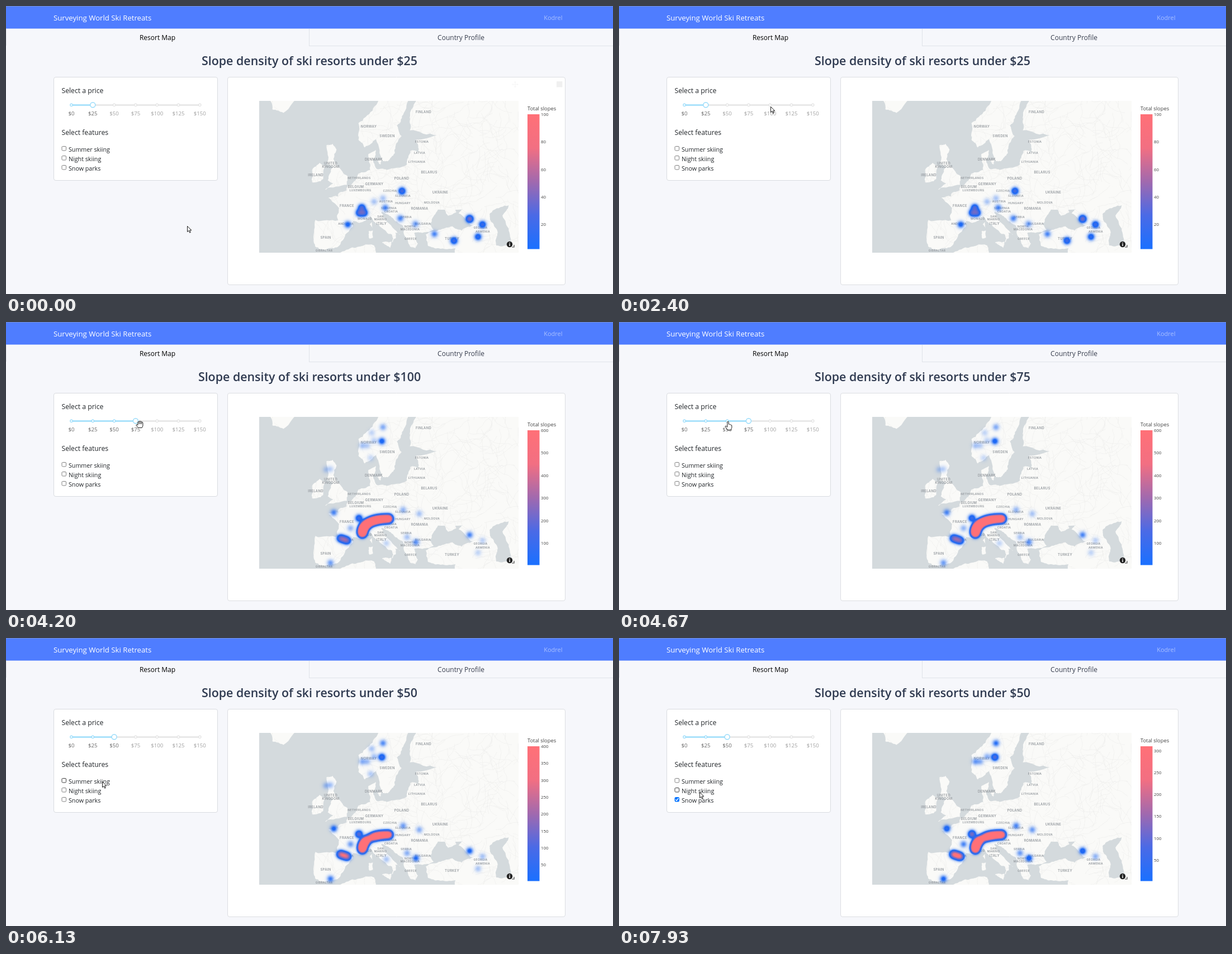
An HTML page with a canvas for the animation above (8000 ms loop, 1086 by 516 pixels).

```html
<!DOCTYPE html>
<html lang="en">
<head>
<meta charset="utf-8">
<title>Ski map</title>
<style>
html, body { margin: 0; width: 100%; height: 100%; overflow: hidden; background: #f6f7fb; }
canvas { display: block; }
</style>
</head>
<body>
<canvas id="stage" width="1086" height="516"></canvas>
<script>
const ctx = document.getElementById('stage').getContext('2d');
const SANS = '"Open Sans", "Noto Sans", sans-serif';
const MAP = { x: 453, y: 170, w: 464, h: 272 };
const BAR = { x: 933, y: 194, w: 21.5, h: 241.5 };

let seed = 11;
const random = () => (seed = seed * 16807 % 2147483647) / 2147483647;

function layer(draw) {
  const c = document.createElement('canvas');
  c.width = 1086;
  c.height = 516;
  draw(c.getContext('2d'));
  return c;
}

function text(g, str, x, y, size, color, { align = 'left', weight = 400, family = SANS } = {}) {
  g.font = `${weight} ${size}px ${family}`;
  g.textAlign = align;
  g.fillStyle = color;
  g.fillText(str, x, y);
}

function finish(g, fill, stroke, width) {
  g.fillStyle = fill;
  g.fill();
  if (!stroke) return;
  g.strokeStyle = stroke;
  g.lineWidth = width;
  g.stroke();
}

function disc(g, x, y, r, fill, stroke, width = 1) {
  g.beginPath();
  g.arc(x, y, r, 0, 7);
  finish(g, fill, stroke, width);
}

function box(g, x, y, w, h, r, fill, stroke) {
  g.beginPath();
  g.roundRect(x, y, w, h, r);
  finish(g, fill, stroke, 1);
}

function lines(g, d, color, width) {
  g.strokeStyle = color;
  g.lineWidth = width;
  g.stroke(new Path2D(d));
}

// ---- Map: key "lon lat" points of each coast, roughened by rule ----
const LAND = {
  scandinavia: '12 66,9.5 63.7,5 61.9,5 59.3,7 58,10.6 59.4,12.8 55.6,14.4 55.6,16.6 57,17 58.6,18.8 59.9,17.3 61.5,19.5 63.4,22 66',
  baltic: '24.5 66,21.5 63,21.4 60.8,30 60,23.5 59.3,24.2 57.2,21.6 57.4,20.5 55,14 54,10.8 54.2,9.7 55.6,10.5 57.6,8.1 56.8,8.7 54,5 53.3,3 51.3,3 46,57 46,57 66',
  west: '6 52,1.5 50.9,1.3 50,-1.4 49.3,-1.5 48.7,-4.6 48.4,-1.2 46.2,-1.5 43.4,-8.8 43.5,-9.3 38.7,-8.8 37,-5.6 36,-2 36.8,0 38.6,3.2 41.9,3.2 43.2,6.5 43.1,8.8 44.4,12.3 41.7,15.7 40,15.8 38,17 39.2,16.8 40.5,18.4 39.9,16 41.6,13.6 43.5,12.3 45.2,13.7 45.7,20 50',
  southeast: '12 46,13.7 44.9,16.5 43.4,19.4 41.8,19.5 40.2,21.5 37,23.2 36.6,24 37.7,22.8 40.4,26.2 40.6,29 41.2,27.7 42.6,29.8 45.2,31 46.6,32.7 45.7,33.6 44.5,36.3 45.3,35.5 46.4,39.2 47.2,37 45,41.5 42.2,38 41,35 42,31.3 41.2,26.5 40,27.2 37.2,30.6 36.6,36 36.6,36 35,57 35,57 51,20 51',
  britain: '-5.7 50.1,1.4 51.1,1.6 52.7,.2 53.3,-3 56,-2 57.6,-3.2 58.6,-5.2 58.4,-5 55,-3 54.5,-4.8 52,-3 51.4',
  ireland: '-6.2 53.5,-6.4 52.2,-9.8 51.6,-9.8 54,-7.4 55.3,-5.6 54.6',
  iceland: '-24 66,-22.5 63.9,-19 63.4,-13.7 66',
  corsica: '8.6 42.4,9.4 43,9.5 41.5',
  sardinia: '8.3 40.9,9.6 41,9.6 39.2,8.5 39',
  sicily: '12.5 38,15.6 38.2,15.1 36.7',
  zealand: '11 55.7,12.5 56,12 55',
  africa: '-2 35,3 36.8,10 37.3,10.5 35'
};
const CASPIAN = '47 45,47.5 43,49.5 40.5,49 37.3,54 37,53 41,51 44.5,53 46.8,48 45.7';

const project = (lon, lat) => [
  602.6 + 5.6 * lon,
  654.5 - 321 * Math.log(Math.tan(Math.PI / 4 + lat * Math.PI / 360))
];

function roughen(points) {
  return points.flatMap(([x, y], i) => {
    const [nx, ny] = points[(i + 1) % points.length];
    const bend = Math.min(.3, 4 / Math.hypot(nx - x, ny - y)) * (random() - .5);
    return [[x, y], [(x + nx) / 2 + (y - ny) * bend, (y + ny) / 2 + (nx - x) * bend]];
  });
}

function coast(str) {
  let points = str.split(',').map(pair => project(...pair.split(' ').map(Number)));
  for (let i = 0; i < 3; i++) points = roughen(points);
  return new Path2D('M' + points.join('L') + 'Z');
}

// "/" starts a new line
const BIG_LABELS = 'NORWAY 649 218,SWEDEN 682 235,FINLAND 747 192,DENMARK 658 277,UNITED/KINGDOM 581 284,GERMANY 659 321,POLAND 708 311,BELARUS 757 300,UKRAINE 777 336,FRANCE 610 360,SPAIN 572 417,ITALY 672 392,TURKEY 798 419,ROMANIA 740 365,BELGIUM 626 326,IRELAND 554 305';
const SMALL_LABELS = 'ESTONIA 744 245,LATVIA 740 265,LITHUANIA 735 281,NETHERLANDS 632 310,LUXEMBOURG 634 332,CZECHIA 687 333,SLOVAKIA 710 342,AUSTRIA 680 352,HUNGARY 710 355,MOLDOVA 762 354,SLOVENIA 685 364,CROATIA 689 370,SAN/MARINO 670 379,MONACO 642 383,ANDORRA 608 392,SERBIA 716 380,BULGARIA 746 392,NORTH/MACEDONIA 723 397,GREECE 724 419,GEORGIA 849 399,ARMENIA 853 406,GIBRALTAR 569 440';

function drawLabels(g, labels, size) {
  g.letterSpacing = '0.3px';
  for (const label of labels.split(',')) {
    const [name, x, y] = label.split(' ');
    name.split('/').forEach((line, i) =>
      text(g, line, +x, +y + i * (size + .3), size, '#959a9f', { align: 'center', weight: 600, family: 'Inter, sans-serif' }));
  }
}

function drawRoads(g) {
  g.lineWidth = .6;
  g.strokeStyle = '#ededeb';
  for (let i = 0; i < 420; i++) {
    let x = MAP.x + random() * MAP.w, y = MAP.y + random() * MAP.h, angle = random() * 6.3;
    g.beginPath();
    g.moveTo(x, y);
    for (let k = 0; k < 9; k++) {
      angle += random() - .5;
      g.lineTo(x += 5 * Math.cos(angle), y += 5 * Math.sin(angle));
    }
    g.stroke();
  }
}

function drawMap(g) {
  g.beginPath();
  g.rect(MAP.x, MAP.y, MAP.w, MAP.h);
  g.clip();
  g.fillStyle = '#d4dadd';
  g.fill();
  g.save();
  const land = new Path2D();
  g.fillStyle = '#fafaf8';
  for (const part of Object.values(LAND).map(coast)) {
    g.fill(part);
    land.addPath(part);
  }
  g.clip(land);
  drawRoads(g);
  g.restore();
  g.fillStyle = '#d4dadd';
  g.fill(coast(CASPIAN));
  drawLabels(g, BIG_LABELS, 5.9);
  drawLabels(g, SMALL_LABELS, 5.1);
}

// ---- Heat layers: [x, y, weight] summed as Gaussians ----
const CHEAP = [
  [636, 361, .24], [632, 370, .25], [640, 370, .25], [708, 331, .22], [658, 350, .04], [674, 344, .04], [678, 361, .09],
  [611, 391, .13], [705, 380, .09], [732, 390, .07], [766, 408, .09], [801, 420, .21], [829, 381, .34], [852, 391, .2], [844, 413, .17]
];
const RESORTS = [
  [674, 188, .06], [654, 198, .028], [672, 213, .14], [658, 212, .03], [637, 221, .04], [646, 221, .03], [652, 243, .025],
  [572, 264, .028], [580, 263, .028], [586, 341, .09], [616, 369, .05], [710, 336, .05], [739, 343, .04], [829, 381, .09],
  [852, 391, .03], [844, 413, .028], [733, 394, .08], [717, 385, .04], [680, 396, .028], [580, 431, .07], [631, 351, .2]
];

// resorts strung along an arc, thinning out in its middle by `gap`
function alps(weight, gap) {
  return Array.from({ length: 13 }, (_, i) => {
    const u = i / 12, v = 1 - u;
    return [
      637 * v * v + 1274 * u * v + 684 * u * u,
      378 * v * v + 706 * u * v + 352 * u * u,
      weight * (1 - gap * Math.exp(-(((u - .52) / .13) ** 2)))
    ];
  });
}
const pyrenees = weight => [598, 604, 610].map((x, i) => [x, 387 + 2 * i, weight]);
const scaled = (points, k) => points.map(([x, y, w]) => [x, y, w * k]);

function heat(points) {
  return layer(g => {
    const image = g.createImageData(MAP.w, MAP.h);
    for (let p = 0; p < MAP.w * MAP.h; p++) {
      const px = MAP.x + p % MAP.w, py = MAP.y + Math.floor(p / MAP.w);
      let v = 0;
      for (const [x, y, w] of points) v += w * Math.exp(-((x - px) ** 2 + (y - py) ** 2) / 34);
      const mix = Math.min(1, Math.max(0, (v - .13) / .55));
      image.data.set([28 + 227 * mix, 104 + 8 * mix, 245 - 126 * mix, 255 * Math.min(1, v / .11)], p * 4);
    }
    g.putImageData(image, MAP.x, MAP.y);
  });
}

const HEAT = {
  cheap: heat(CHEAP),
  wide: heat([...RESORTS, ...alps(1.3, .2), ...pyrenees(.28)]),
  mid: heat([...scaled(RESORTS, 1.4), ...alps(1, .7), ...pyrenees(.42)]),
  parks: heat([...scaled(RESORTS.filter(r => r[2] >= .03), 1.8), ...alps(1.1, .65), ...pyrenees(.5)])
};

// ---- Static page ----
const page = layer(g => {
  g.fillStyle = '#f6f7fb';
  g.fillRect(0, 0, 1086, 516);
  g.fillStyle = '#4f7dff';
  g.fillRect(0, 0, 1086, 40.5);
  g.fillStyle = '#7590d8';
  g.fillRect(0, 0, 1086, 1);
  text(g, 'Surveying World Ski Retreats', 85, 25.5, 13.2, '#fff');
  text(g, 'Kodrel', 995.5, 24.5, 11, '#a9c0ff', { align: 'right' });

  g.fillStyle = '#e0e3e9';
  g.fillRect(0, 41, 1, 30);
  g.fillRect(542, 41, 1, 31);
  g.fillRect(543, 71, 543, 1);
  text(g, 'Resort Map', 271, 60.5, 12, '#000', { align: 'center' });
  text(g, 'Country Profile', 814, 60.5, 12, '#373d4d', { align: 'center' });

  box(g, 85.5, 127.5, 293, 185, 3.5, '#fff', '#d9dbe0');
  box(g, 396.5, 127.5, 604, 372, 3.5, '#fff', '#dcdee2');
  text(g, 'Select a price', 99.5, 156, 12.2, '#212529');
  text(g, 'Select features', 99.5, 231, 12.2, '#212529');
  text(g, 'Total slopes', BAR.x, 187, 9.3, '#444');

  const ramp = g.createLinearGradient(0, BAR.y, 0, BAR.y + BAR.h);
  ['#ff7077', '#f26f82', '#a169ae', '#4a6ae6', '#1a70ff'].forEach((color, i) => ramp.addColorStop(i / 4, color));
  g.fillStyle = ramp;
  g.fillRect(BAR.x, BAR.y, BAR.w, BAR.h);
  drawMap(g);
});

// ---- Timeline ----
const EVENTS = [
  [0, { slider: 1, price: 25, heat: 'cheap', max: 100, snow: false }],
  [2860, { slider: 4 }],
  [3190, { price: 100, heat: 'wide', max: 600 }],
  [4190, { slider: 3 }],
  [4520, { price: 75 }],
  [4720, { slider: 2 }],
  [4990, { price: 50, max: 400 }],
  [5060, { heat: 'mid' }],
  [7060, { snow: true }],
  [7390, { heat: 'parks', max: 310 }]
];
const stateAt = t => Object.assign({}, ...EVENTS.filter(([start]) => t >= start).map(([, change]) => change));

// pointer moves: start, end, x, y
const MOVES = [
  [0, 200, 328, 405], [333, 600, 330, 396], [800, 1000, 326, 353], [1133, 1470, 425, 297], [1700, 2133, 272, 183],
  [2333, 2530, 270, 173], [3533, 4000, 239, 178], [4400, 4667, 195, 178], [5200, 5470, 202, 175], [5470, 5870, 180, 249],
  [5870, 6733, 144, 287], [6733, 6800, 144, 295], [7000, 7200, 143, 287], [7467, 7933, 144, 276]
];

function pointerAt(t) {
  let x = 324, y = 394;
  for (const [start, end, toX, toY] of MOVES) {
    const k = Math.min(1, Math.max(0, (t - start) / (end - start)));
    const ease = k * k * (3 - 2 * k);
    x += (toX - x) * ease;
    y += (toY - y) * ease;
  }
  return { x, y };
}

// ---- Moving parts ----
const stop = i => 117 + 38.3 * i;

function drawSlider(value) {
  box(ctx, 117, 176, 230, 3, 1.5, '#e9e9e9');
  box(ctx, 117, 176, stop(value) - 117, 3, 1.5, '#abe2fb');
  for (let i = 0; i < 7; i++) {
    const on = i <= value;
    disc(ctx, stop(i), 177.3, 2.2, '#fff', on ? '#96dbfa' : '#e2e2e2', 1.2);
    text(ctx, '$' + 25 * i, stop(i), 196, 9.6, on ? '#666' : '#a0a0a0', { align: 'center' });
  }
  disc(ctx, stop(value), 177.3, 4.5, '#fff', '#96dbfa', 1.4);
}

function drawChecks(snow, { x, y }) {
  ['Summer skiing', 'Night skiing', 'Snow parks'].forEach((name, i) => {
    const top = 251.5 + 17 * i;
    const hover = x > 99 && x < 186 && y > top - 4 && y <= top + 13;
    const checked = snow && i === 2;
    const edge = hover ? '#3c3c3c' : '#808080';
    box(ctx, 100, top, 7.5, 7.5, 1.5, checked ? '#0075ff' : '#fff', checked ? '#0075ff' : edge);
    if (checked) lines(ctx, `M101.2 ${top + 4}l1.9 2 3.4-4.6`, '#fff', 1.4);
    text(ctx, name, 112, top + 9, 10.7, '#212529');
  });
}

function drawScale(max) {
  const step = max > 400 ? 100 : max > 100 ? 50 : 20;
  for (let v = step; v <= max; v += step) {
    text(ctx, v, 957, BAR.y + BAR.h * (max - v) / (max - 2) + 3, 7.9, '#444');
  }
}

function drawToolbar(t) {
  const idle = t < 1190;
  const shown = idle ? .09 : Math.min((t - 1190) / 200, (2130 - t) / 300, 1);
  if (shown <= 0) return;
  ctx.save();
  ctx.globalAlpha = shown;
  box(ctx, 985, 135, 10.5, 10.5, .5, '#5c5c5c');
  lines(ctx, 'M906 140.5h10M911 135.5v10M907.5 139l-1.5 1.5 1.5 1.5M914.5 139l1.5 1.5-1.5 1.5M909.5 137l1.5-1.5 1.5 1.5M909.5 144l1.5 1.5 1.5-1.5', '#a9a9a9', 1.2);
  if (!idle) {
    const grey = '#d4d4d4';
    box(ctx, 883, 137, 11, 8, 1, grey);
    box(ctx, 886, 135.5, 5, 3, 1, grey);
    disc(ctx, 888.5, 141, 2.1, grey, '#fff', 1.1);
    box(ctx, 929, 136, 10, 9.5, 1, grey);
    box(ctx, 946, 136, 10, 9.5, 1, grey);
    lines(ctx, 'M931 140.7h6M934 137.7v6M948 140.7h6', '#fff', 1.4);
    ctx.fillStyle = grey;
    ctx.fill(new Path2D('M962 141l5.5-5.5 5.5 5.5h-1.5v4h-3v-3h-2v3h-3v-4z'));
  }
  ctx.restore();
}

function drawInfo() {
  disc(ctx, 901, 427, 5.2, '#222');
  ctx.fillStyle = '#fff';
  ctx.fillRect(900.3, 426.2, 1.5, 3.8);
  ctx.fillRect(900.3, 423.8, 1.5, 1.5);
  lines(ctx, 'M905 432h4v-4', '#444', 1.2);
}

const CURSORS = {
  arrow: new Path2D('M.5.5V10.6L2.9 8.4 4.6 12.2 6.3 11.5 4.6 7.8H7.9Z'),
  hand: new Path2D('M-1.2 1Q0-.8 1.2 1V5.2Q2.4 4.3 3.2 5.8 4.6 5 5.2 6.6 6.8 6.3 6.8 8V11.5L5.6 13.5V15.5H-1.4V14L-4.9 9.8Q-5.4 8-3.4 8.4L-1.2 10.2Z'),
  grab: new Path2D('M-3.2 7V1.2Q-2.2-.3-1 1.2 0-2.2 1.3.4 2.6-1.2 3.6 1.2 5.4.6 5.9 3V8L4.2 11.5H-2.5L-6 7.2Q-6 5.2-4.3 5.9ZM-1 1.2V5M1.3.5V5M3.6 1.2V5')
};

function cursorKind({ x, y }, value) {
  const nearest = Math.round((x - 117) / 38.3);
  const onStop = y > 170 && y < 180 && Math.abs(x - stop(nearest)) < 8;
  if (!onStop) return 'arrow';
  return nearest === value ? 'grab' : 'hand';
}

function drawCursor(kind, { x, y }) {
  ctx.save();
  ctx.translate(Math.round(x), Math.round(y));
  ctx.fillStyle = '#fff';
  ctx.fill(CURSORS[kind]);
  ctx.strokeStyle = '#111';
  ctx.lineWidth = .95;
  ctx.stroke(CURSORS[kind]);
  ctx.restore();
}

function frame(now) {
  // motion advances in steps of 1/15 s
  const t = Math.round(Math.floor((now % 8000 + 5) * .015) / .015);
  const state = stateAt(t);
  const pointer = pointerAt(t);
  ctx.drawImage(page, 0, 0);
  ctx.drawImage(HEAT[state.heat], 0, 0);
  text(ctx, 'Slope density of ski resorts under $' + state.price, 543, 105.5, 21.4, '#2f3a50', { align: 'center', weight: 600 });
  drawSlider(state.slider);
  drawChecks(state.snow, pointer);
  drawScale(state.max);
  drawToolbar(t);
  drawInfo();
  drawCursor(cursorKind(pointer, state.slider), pointer);
  requestAnimationFrame(frame);
}
requestAnimationFrame(frame);
</script>
</body>
</html>
```
